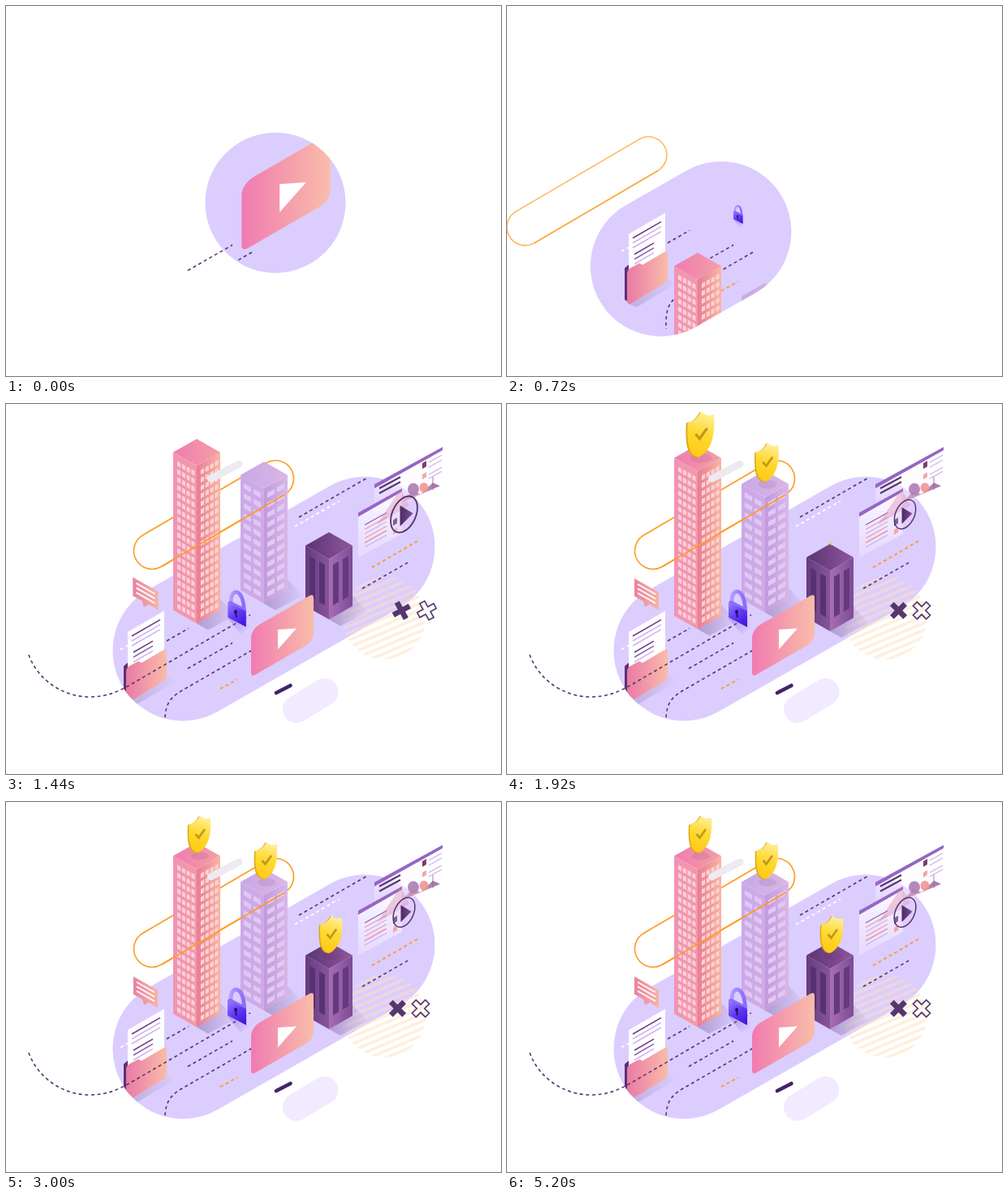
An HTML page with a canvas for the animation above (6000 ms loop, 610 by 456 pixels).

```html
<!DOCTYPE html>
<html lang="en">
<head>
<meta charset="utf-8">
<style>
html, body { margin: 0; width: 100%; height: 100%; overflow: hidden; background: #fff; }
canvas { display: block; }
</style>
</head>
<body>
<canvas id="stage" width="610" height="456"></canvas>
<script>
const ctx = document.getElementById('stage').getContext('2d');
const LOOP = 6000, R = 86.5, TILT = Math.atan(0.571);
const PLUM = '#56366f', ORANGE = '#ff9a1f', PINK = '#f07bb0', PEACH = '#f9bda9';

// Timing
const span = (t, start, length) => Math.min(1, Math.max(0, (t - start) / length));
const cubicOut = u => 1 - (1 - u) ** 3;
const inOut = u => u < 0.5 ? 4 * u ** 3 : 1 - 4 * (1 - u) ** 3;
const backOut = u => 1 + 2.7 * (u - 1) ** 3 + 1.7 * (u - 1) ** 2;
const mix = (a, b, u) => a + (b - a) * u;
const spring = (t, start) => {
  const u = t - start;
  return u <= 0 ? 0 : 1 - Math.exp(-0.0041 * u) * Math.cos(Math.PI * u / 360);
};

// Drawing helpers
function grad(x1, y1, x2, y2, ...colors) {
  const g = ctx.createLinearGradient(x1, y1, x2, y2);
  colors.forEach((c, i) => g.addColorStop(i / (colors.length - 1), c));
  return g;
}
function poly(fill, ...p) {
  ctx.beginPath();
  for (let i = 0; i < p.length; i += 2) ctx.lineTo(p[i], p[i + 1]);
  ctx.closePath();
  ctx.fillStyle = fill;
  ctx.fill();
}
function line(x1, y1, x2, y2, color, width = 1.6, dash = []) {
  ctx.beginPath();
  ctx.moveTo(x1, y1);
  ctx.lineTo(x2, y2);
  stroke(color, width, dash);
}
function stroke(color, width, dash = []) {
  ctx.setLineDash(dash);
  ctx.strokeStyle = color;
  ctx.lineWidth = width;
  ctx.stroke();
  ctx.setLineDash([]);
}
function disc(x, y, rx, ry, fill) {
  ctx.beginPath();
  ctx.ellipse(x, y, rx, ry, 0, 0, 7);
  ctx.fillStyle = fill;
  ctx.fill();
}
function group(draw, x = 0, y = 0, scale = 1, turn = 0, alpha = 1) {
  if (scale <= 0 || alpha <= 0) return;
  ctx.save();
  ctx.globalAlpha = alpha;
  ctx.translate(x, y);
  ctx.rotate(turn);
  ctx.scale(scale, scale);
  draw();
  ctx.restore();
}
function pillPath(ax, ay, bx, by, r) {
  const down = Math.PI / 2 - TILT;
  ctx.beginPath();
  ctx.arc(ax, ay, r, down, down + Math.PI);
  ctx.arc(bx, by, r, down + Math.PI, down + 2 * Math.PI);
  ctx.closePath();
}

function tower(cx, apex, h, roof, left, right, details) {
  const top = apex + 33;
  poly(grad(cx + 5, top + h, cx + 50, top + h, 'rgba(110,80,130,.36)', 'rgba(110,80,130,0)'),
    cx, top + h, cx + 29, top + h - 30, cx + 48, top + h - 10, cx + 14, top + h + 8);
  poly(roof, cx, apex, cx + 29, apex + 16.5, cx, top, cx - 29, apex + 16.5);
  for (const side of [-1, 1]) {
    ctx.save();
    ctx.transform(1, -0.57 * side, 0, 1, cx, top);
    ctx.fillStyle = side < 0 ? left : right;
    ctx.fillRect(side < 0 ? -29 : 0, 0, 29, h);
    details(side < 0 ? -29 : 0, side);
    ctx.restore();
  }
}
function windows(x, cols, pitchX, w, rows, pitchY, h, color) {
  ctx.fillStyle = color;
  for (let r = 0; r < rows; r++)
    for (let c = 0; c < cols; c++) ctx.fillRect(x + c * pitchX, 8 + r * pitchY, w, h);
}
function pinkTower(y) {
  tower(235, 50 + y, 194.5, grad(206, 0, 264, 0, PINK, '#f3a0a6'),
    grad(-29, 0, 0, 0, '#f193b4', '#f19aa8'), grad(0, 0, 29, 0, '#ea7c98', '#f9b5a3'),
    (x, side) => windows(x + 5, 4, 5.8, 4.1, 19, 9.75, 5.8, side < 0 ? '#fbd0da' : '#fcd3d0'));
}
function lilacTower(y) {
  tower(318, 82 + y, 142, grad(289, 0, 347, 0, '#c9a7e6', '#dab6e3'),
    grad(-29, 0, 0, 0, '#cba9e7', '#cfaae5'), grad(0, 0, 29, 0, '#c19adf', '#d8b7e8'),
    (x, side) => windows(x + 4, 2, 12, 9, 11, 12.2, 6.2, side < 0 ? '#dfc8f5' : '#e1c9f2'));
}
function darkTower(y) {
  tower(398, 172.5 + y, 74.5, grad(369, 0, 427, 0, '#5a3474', '#8f569b'),
    grad(-29, 0, 0, 0, '#663b7f', '#87549c'), grad(0, 0, 29, 0, '#a86db5', '#7c4c95'),
    (x, side) => {
      ctx.fillStyle = side < 0 ? '#573273' : '#64397e';
      ctx.fillRect(x + 5, 10, 7, 50);
      ctx.fillRect(x + 17, 10, 7, 50);
    });
}

function folder() {
  poly(grad(150, 360, 212, 345, 'rgba(110,80,130,.25)', 'rgba(110,80,130,0)'),
    150, 367, 198, 334, 209, 342, 160, 371);
  poly('#5a3272', 145, 323, 151, 318, 158, 320, 152, 366, 145, 362);
  poly('#fff', 150, 281, 195, 255, 195, 305, 150, 328);
  [[286, 35, '#6b3b86'], [292, 35, '#cdb2ee'], [298, 35, '#cdb2ee'],
   [306, 24, '#6b3b86'], [312, 24, '#8d62b0'], [318, 24, '#cdb2ee']].forEach(([y, w, color], i) => {
    const x = i < 3 ? 155 : 157;
    line(x, y, x + w, y - w * 0.577, color, 1.5);
  });
  ctx.beginPath();
  ctx.moveTo(148, 330);
  ctx.quadraticCurveTo(148, 325, 152, 323);
  ctx.lineTo(163, 317);
  ctx.lineTo(167, 319);
  ctx.lineTo(196, 302);
  ctx.quadraticCurveTo(198, 301, 198, 304);
  ctx.lineTo(198, 336);
  ctx.quadraticCurveTo(198, 339, 195, 341);
  ctx.lineTo(152, 367);
  ctx.quadraticCurveTo(148, 368, 148, 363);
  ctx.fillStyle = grad(147, 0, 198, 0, '#ea78a6', PEACH);
  ctx.fill();
}

function videoCard() {
  ctx.save();
  ctx.transform(1, -0.577, 0, 1, 0, 0);
  ctx.beginPath();
  ctx.roundRect(-38.5, -28.5, 77, 59, [10, 5, 9, 5]);
  ctx.fillStyle = grad(-38, 0, 38, 0, PINK, PEACH);
  ctx.fill();
  ctx.restore();
  poly('#fff', -5.5, -6, 17.5, -7.5, -5.5, 18.5);
}

function lock() {
  poly(grad(-6, 8, 14, 20, 'rgba(120,80,210,.3)', 'rgba(120,80,210,0)'), -12, 2, 11, 0, 15, 15, 4, 22);
  ctx.beginPath();
  ctx.moveTo(-7.5, -14);
  ctx.bezierCurveTo(-11, -37, 8, -38, 8.5, -8);
  stroke(grad(-8, 0, 8, 0, '#b39cff', '#8a6bff'), 4.8);
  poly('#8a6ef8', -12, -18, -9, -20, 11, -10, 11, 12, 8, 10);
  poly(grad(-12, -18, 11, 12, '#9a80ff', '#6238f5', '#3a12d6'), -12, -18, 11, -7, 11, 13, -12, 1);
  disc(-2, -6, 2, 2.6, '#25106e');
  line(-2, -5, -1, 1, '#25106e', 1.8);
}

function bubble() {
  ctx.beginPath();
  for (const [x, y] of [[-15, -32], [15, -15], [15, 7], [4, 0], [-2, 3], [-4, -4], [-15, -10]]) ctx.lineTo(x, y);
  ctx.closePath();
  ctx.fillStyle = grad(-15, 0, 15, 0, '#ea829f', '#f7b5a6');
  ctx.fill();
  for (const y of [-25, -19.5, -14]) line(-11, y, 11, y + 12.5, '#fff', 1.7);
}

function shield() {
  const body = () => {
    ctx.beginPath();
    ctx.moveTo(-12.5, -12);
    ctx.bezierCurveTo(-8, -12, -2, -16, 1, -23);
    ctx.bezierCurveTo(4, -19, 9, -18, 14, -20);
    ctx.bezierCurveTo(15, 2, 12, 15, -1, 23);
    ctx.bezierCurveTo(-10, 22, -14, 13, -12.5, -12);
    ctx.fill();
  };
  ctx.fillStyle = '#d8a81e';
  group(body, -1.5, 0.6);
  ctx.fillStyle = grad(-6, 22, 8, -22, '#ffc914', '#ffd92e', '#fff0a0');
  body();
  ctx.beginPath();
  ctx.moveTo(-4.5, 0);
  ctx.lineTo(-0.5, 4.5);
  ctx.lineTo(7, -6);
  stroke('#c2981f', 2.7);
}

function panels() {
  poly(grad(0, 75, 0, 130, 'rgba(255,255,255,.75)', 'rgba(248,240,255,.15)'), 454, 100, 538, 55, 538, 98, 454, 145);
  poly('#9566c4', 454, 99, 538, 53, 538, 57, 454, 104);
  for (const y of [104, 110]) line(460, y, 486, y - 14, PLUM, 2);
  for (const y of [72, 78, 87, 92]) line(521, y, 537, y - 9, '#cfb0ea', 1.2);
  poly('#7a3f70', 513, 73, 518, 70, 518, 77, 513, 80);
  poly('#f3a7a8', 513, 87, 518, 84, 518, 90, 513, 93);
  poly(grad(490, 110, 534, 110, 'rgba(214,140,170,.7)', 'rgba(120,60,130,.7)'), 488, 121, 500, 108, 511, 111, 526, 97, 535, 101);
  line(526, 90, 526, 106, '#9a5e96', 0.8);
  disc(502, 105, 7, 7.5, 'rgba(172,125,180,.9)');
  disc(515, 103, 5.5, 6, 'rgba(240,150,145,.9)');
  poly(grad(0, 120, 0, 188, 'rgba(255,255,255,.82)', 'rgba(240,230,255,.5)'), 434, 136, 488, 106, 488, 160, 434, 189);
  poly('#9566c4', 434, 134, 488, 104, 488, 108, 434, 139);
  ['#8b5fb8', '#f29aa8', '#cbb0ec', '#f29aa8', '#ec7f96', '#cbb0ec'].forEach((color, i) =>
    line(442, 149 + i * 5.5, 469, 134 + i * 5.5, color, 1.3));
  poly('rgba(214,130,170,.4)', 457, 149, 486, 105, 497, 125);
  poly('#4b2a66', 477, 143, 482, 140, 482, 147, 477, 150);
  poly('#f3a7a8', 477, 155, 482, 152, 482, 158, 477, 161);
}

function playBadge() {
  ctx.save();
  ctx.transform(1, -0.5, 0, 1, 0, 0);
  disc(0, 0, 13.4, 17, 'rgba(225,200,240,.35)');
  ctx.restore();
  stroke(PLUM, 1.5);
  poly(grad(-4, 0, 9, 0, '#4b2a66', '#7d4c92'), -4, -9, 9, -1, -4, 12);
}

function cross(filled) {
  const a = 11.5, b = 3.4;
  ctx.rotate(Math.PI / 4);
  ctx.beginPath();
  for (let i = 0; i < 4; i++) {
    ctx.lineTo(a, -b);
    ctx.lineTo(a, b);
    ctx.lineTo(b, b);
    ctx.rotate(Math.PI / 2);
  }
  ctx.closePath();
  ctx.fillStyle = PLUM;
  if (filled) ctx.fill();
  else stroke(PLUM, 1.7);
}

function stripes() {
  ctx.beginPath();
  ctx.arc(0, 0, 51, 0, 7);
  ctx.clip();
  ctx.rotate(-0.4);
  for (let y = -48; y < 52; y += 8) line(-52, y, 52, y, 'rgba(253,226,190,.5)', 3.6);
}

function draw(t) {
  ctx.clearRect(0, 0, 610, 456);
  ctx.lineCap = 'butt';

  // The backdrop slides down-left as a disc, then stretches into a pill.
  const slide = inOut(span(t, 0, 600)), grow = cubicOut(span(t, 620, 800));
  const startX = mix(332, 175, slide), startY = mix(242.5, 329, slide);
  const ax = mix(startX, 218, grow), ay = mix(startY, 304, grow);
  const bx = mix(startX, 442, grow), by = mix(startY, 176, grow);
  pillPath(ax, ay, bx, by, R);
  ctx.fillStyle = '#dccdff';
  ctx.fill();

  const circleIn = cubicOut(span(t, 950, 400));
  group(stripes, 466, 264, circleIn, 0, circleIn);

  ctx.save();
  pillPath(ax, ay, bx, by, R);
  ctx.clip();
  const dash = [4, 3.6];
  line(198, 292, 225, 276.5, PLUM, 1.6, dash);
  line(264, 351, 285, 339.5, ORANGE, 1.8, dash);
  line(141, 302.5, 162, 291, '#fff', 1.8, dash);
  line(356, 151, 411, 119.5, '#fff', 1.8, dash);
  line(361, 139.5, 446, 90.5, PLUM, 1.6, dash);
  line(439, 227.5, 495, 195.5, PLUM, 1.6, dash);
  line(451, 201.5, 507, 169, ORANGE, 1.8, dash);
  ctx.beginPath();
  ctx.moveTo(303, 303.5);
  ctx.lineTo(217, 353);
  ctx.bezierCurveTo(200, 363, 195, 372, 196, 398);
  stroke(PLUM, 1.6, dash);
  folder();
  ctx.restore();
  line(224, 326, 279, 294.5, PLUM, 1.6, dash);

  // Outlined pill: its lower edge passes in front of the towers.
  const ring = 1 - inOut(span(t, 600, 780)), ringX = -160 * ring, ringY = 93 * ring;
  const ringAlpha = span(t, 450, 380);
  group(() => {
    pillPath(180, 181, 332, 92, 22.5);
    stroke(ORANGE, 1.6);
  }, ringX, ringY, 1, 0, ringAlpha);

  ctx.save();
  const down = Math.PI / 2 - TILT;
  ctx.beginPath();
  ctx.moveTo(ax - R, -60);
  ctx.arc(ax, ay, R, Math.PI, down, true);
  ctx.arc(bx, by, R, down, 0, true);
  ctx.lineTo(bx + R, -60);
  ctx.clip();
  const rise = (tower, start, depth) => {
    if (t > start) tower(depth * (1 - backOut(span(t, start, 900))));
  };
  rise(lilacTower, 700, 290);
  rise(pinkTower, 640, 405);
  rise(darkTower, 740, 270);
  ctx.restore();

  group(() => line(191.5, 200.5, 343.5, 111.5, ORANGE), ringX, ringY, 1, 0, ringAlpha);

  const panelIn = cubicOut(span(t, 900, 480));
  group(panels, 38 * (1 - panelIn), -22 * (1 - panelIn), 1, 0, panelIn);
  group(playBadge, 490.5, 136, spring(t, 1080));

  // Loose bars and the small pale pill
  const barIn = cubicOut(span(t, 850, 500)), away = 1 - barIn;
  ctx.lineCap = 'round';
  group(() => line(252.5, 92, 287, 74, '#edeaf2', 9), -50 * away, 29 * away, 1, 0, barIn);
  group(() => line(333, 356, 350.5, 347, '#43236a', 4.6), -50 * away, 29 * away, 1, 0, barIn);
  ctx.lineCap = 'butt';
  group(() => {
    pillPath(358, 376, 392.5, 355, 17);
    ctx.fillStyle = '#f2eaff';
    ctx.fill();
  }, -110 * away, 64 * away, 1, 0, barIn);

  // Long dashed path, revealed from its left end
  if (t > 800) {
    ctx.save();
    ctx.beginPath();
    ctx.rect(0, 0, 26 + 280 * inOut(span(t, 800, 600)), 456);
    ctx.clip();
    ctx.beginPath();
    ctx.moveTo(28, 309);
    ctx.bezierCurveTo(40, 342, 72, 361, 103, 361);
    ctx.bezierCurveTo(125, 361, 139, 354, 155, 345);
    ctx.lineTo(301, 260);
    stroke(PLUM, 1.6, dash);
    ctx.restore();
  }

  group(lock, 285, 262, spring(t, 632));
  group(bubble, 172, 247, backOut(span(t, 1040, 500)));

  ctx.save();
  pillPath(ax, ay, bx, by, R);
  ctx.clip();
  group(videoCard, 345, 228, 1.42 * (1 - inOut(span(t, 20, 480))));
  group(videoCard, 340.5, 284, t > 740 ? backOut(span(t, 740, 600)) : 0);
  ctx.restore();

  const roll = 1 - cubicOut(span(t, 1200, 500)), rollAlpha = span(t, 1200, 120);
  group(() => cross(true), 482.5 + 35 * roll, 254.5, 1, 2 * roll, rollAlpha);
  group(() => cross(false), 511 + 54 * roll, 254.5, 1, 2 * roll, rollAlpha);

  [[238, 39.5], [320, 72], [400, 163]].forEach(([x, y], i) => {
    const s = spring(t, 1560 + 170 * i);
    if (s > 0) disc(x + 1, y + 27, 11 * s, 5 * s, 'rgba(80,25,90,.09)');
    group(shield, x, y + 10 * (1 - s), s);
  });
}

function frame(now) {
  draw(now % LOOP);
  requestAnimationFrame(frame);
}
requestAnimationFrame(frame);
</script>
</body>
</html>
```
